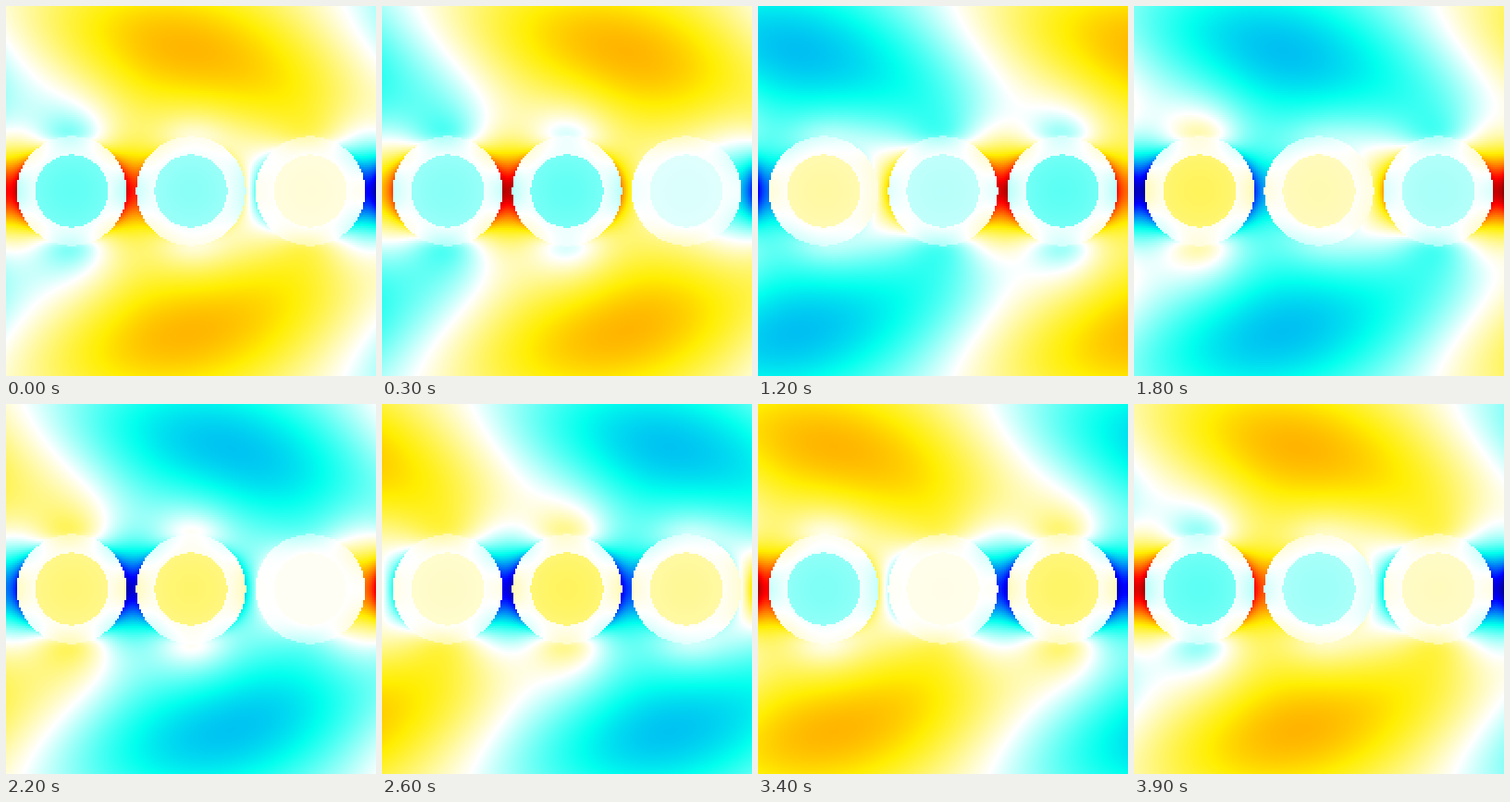
Write an HTML page with a canvas that moves like this. It is 400x400 px and loops after 4000 ms.

```html
<!DOCTYPE html>
<html>
<head>
<meta charset="utf-8">
<style>
  html, body { margin: 0; height: 100%; overflow: hidden; background: #fff; }
  canvas { display: block; width: 400px; height: 400px; image-rendering: pixelated; }
</style>
</head>
<body>
<canvas id="stage" width="200" height="200"></canvas>
<script>
const N = 200, CELL = 2, LOOP = 4000, STEP = 100;
const PITCH = 129, OUTER = 59.2, INNER = 39.2;
const K = Math.PI / 3 / PITCH;          // 60 degrees of phase per cylinder
const centre = m => 200 + (m - 1) * PITCH;

// Colours at field strengths 0, 1, 2.5 and 4
const LEVELS = [0, 1, 2.5, 4];
const WARM = [[255, 255, 255], [255, 238, 0], [255, 0, 0], [0, 0, 0]];
const COLD = [[255, 255, 255], [0, 255, 238], [0, 0, 255], [0, 0, 0]];

const ctx = document.getElementById('stage').getContext('2d');
const image = ctx.createImageData(N, N);
const re = new Float32Array(N * N);
const im = new Float32Array(N * N);
const white = new Float32Array(N * N);  // share of white laid over the field

const polar = (r, a) => [r * Math.cos(a), r * Math.sin(a)];

// Guided wave plus the dipole field and the near halo of a chain of cylinders
function outside(x, y) {
  const d = Math.abs(y);
  const b = 0.8 - 0.72 * Math.cos(2 * Math.PI * d / 300);
  const c = 0.15 + 0.2 * Math.cos(Math.PI * d / 100);
  const cos = Math.cos(K * x), sin = Math.sin(K * x);
  let u = b * cos - c * sin, v = b * sin + c * cos;
  for (let m = -4; m <= 6; m++) {
    const dx = x - centre(m), q = OUTER * OUTER / (dx * dx + y * y);
    const g = 1.45 * (q * Math.cos(2 * Math.atan2(y, dx)) + 0.43 * q ** 4);
    const [p, s] = polar(g, K * centre(m) + 1);
    u += p;
    v += s;
  }
  return [u, v];
}

function fieldAt(x, y) {
  const m = Math.max(0, Math.min(2, Math.round((x - 200) / PITCH) + 1));
  const dx = x - centre(m), r = Math.hypot(dx, y);
  if (r > OUTER) return [...outside(x, y), 0];
  const fade = 1 - 0.15 * Math.min(1, r / INNER) ** 2;
  const core = polar(-fade, K * centre(m) + 0.716);
  if (r < INNER) return [...core, 0.36];
  const depth = (r - INNER) / (OUTER - INNER);
  const top = (y / r) ** 2;
  const rim = outside(centre(m) + dx * OUTER / r, y * OUTER / r);
  const shell = i => 0.15 * core[i] * (1 - depth) +
    depth * (top * rim[i] + (1 - top) * 0.6 * core[i]);
  return [shell(0), shell(1), 0.45];
}

for (let j = 0; j < N; j++)
  for (let i = 0; i < N; i++) {
    const n = j * N + i;
    [re[n], im[n], white[n]] = fieldAt((i + 0.5) * CELL, (j + 0.5) * CELL - 200);
  }

function draw(time) {
  const phase = 2 * Math.PI * time / LOOP;
  const cos = Math.cos(phase), sin = Math.sin(phase);
  for (let n = 0; n < N * N; n++) {
    const v = im[n] * cos - re[n] * sin, a = Math.min(4, Math.abs(v)), w = white[n];
    const map = v > 0 ? WARM : COLD;
    const k = a < 1 ? 0 : a < 2.5 ? 1 : 2;
    const t = (a - LEVELS[k]) / (LEVELS[k + 1] - LEVELS[k]);
    for (let c = 0; c < 3; c++) {
      const tone = map[k][c] + (map[k + 1][c] - map[k][c]) * t;
      image.data[n * 4 + c] = 255 * w + (1 - w) * tone;
    }
    image.data[n * 4 + 3] = 255;
  }
  ctx.putImageData(image, 0, 0);
}

let shown = -1;
function tick() {
  const time = Math.floor(performance.now() % LOOP / STEP) * STEP;
  if (time !== shown) draw(shown = time);
  requestAnimationFrame(tick);
}
tick();
</script>
</body>
</html>
```
